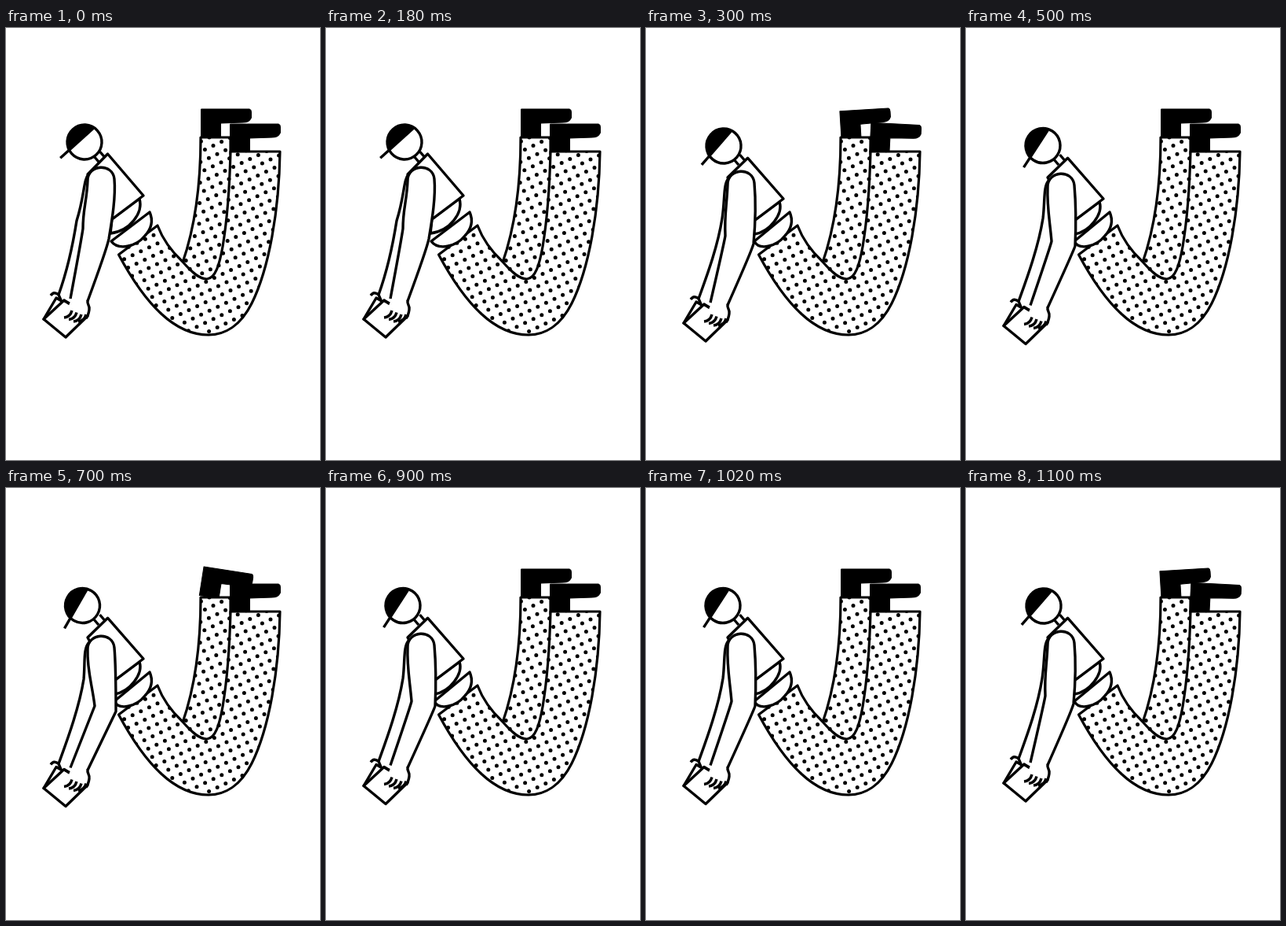
These frames come from a looping animation (400 px wide and 549 px high, 1300 ms). An HTML page with a canvas:

```html
<!DOCTYPE html>
<html lang="en">
<head>
<meta charset="utf-8">
<style>
html, body { margin: 0; width: 100%; height: 100%; overflow: hidden; background: #fff; }
canvas { display: block; width: 400px; height: 549px; }
</style>
</head>
<body>
<canvas id="stage"></canvas>
<script>
const W = 400, H = 549, LOOP = 1300;
const canvas = document.getElementById('stage');
const ctx = canvas.getContext('2d');
const dpr = window.devicePixelRatio || 1;
canvas.width = W * dpr;
canvas.height = H * dpr;

// Crouch poses, from stretched to fully bent
const POSES = [
  { head: [100, 145], cap: 42, chest: 0, arm: 0, hand: 0, inner: [98, 255], outer: [131, 268], back: [90, 245] },
  { head: [99, 150], cap: 49, chest: 4, arm: 5, hand: 5, inner: [101, 264], outer: [137, 274], back: [97, 242] },
  { head: [98, 149.5], cap: 57, chest: 4, arm: 8, hand: 8.5, inner: [109, 271], outer: [139, 277], back: [98, 242] },
  { head: [97.5, 149.5], cap: 60, chest: 4, arm: 11, hand: 11.5, inner: [113, 277], outer: [140, 284], back: [99, 243] }
];
const FLAT = [0, 0, 0];
// Foot tilt in degrees, then its shift
const STEPS = [
  { until: 300, pose: 0, far: FLAT, near: FLAT },
  { until: 500, pose: 1, far: [-3.5, 0.5, 2], near: [3, -0.5, -1] },
  { until: 700, pose: 2, far: FLAT, near: FLAT },
  { until: 900, pose: 3, far: [8.9, -2, -1.5], near: FLAT },
  { until: 1100, pose: 2, far: FLAT, near: FLAT },
  { until: 1300, pose: 1, far: [-3.5, 0.5, 2], near: [3, -0.5, -1] }
];

const FAR_LEG = new Path2D('M248 139 C248 205 240 255 225 298 L262 340 L300 300 V165 L286 160 V139 Z');
const NEAR_LEG = new Path2D('M143.5 288 L193 251 C201 272 212 285 225 297 C238 312 247 319 256 319 C267 318 272 300 276 278 C283 236 285 198 286 157 L349 157 C348 232 335 306 313 350 C299 378 279 390 258 390 C215 390 178 352 143.5 288 Z');
const SHOE = new Path2D('M0 0 H62 Q64 1 64 4 V11 Q62 17 54 17 L25 18 V37 H0 Z');

function ink(d, fill) {
  const p = new Path2D(d);
  if (fill) {
    ctx.fillStyle = fill;
    ctx.fill(p);
  }
  ctx.stroke(p);
}

function trousers(leg) {
  ctx.fillStyle = '#fff';
  ctx.fill(leg);
  ctx.save();
  ctx.clip(leg);
  ctx.fillStyle = '#000';
  ctx.beginPath();
  for (let i = -24; i <= 24; i++) {
    for (let j = -24; j <= 24; j++) {
      const x = 256 + 5 * i + 10.6 * j, y = 270 + 10.6 * i - 5 * j;
      if (x < 140 || x > 352 || y < 135 || y > 394) continue;
      ctx.moveTo(x + 2.5, y);
      ctx.arc(x, y, 2.5, 0, 7);
    }
  }
  ctx.fill();
  ctx.restore();
  ctx.stroke(leg);
}

function shoe(x, y, [deg, dx, dy]) {
  ctx.save();
  ctx.translate(x + 13 + dx, y + 35 + dy);
  ctx.rotate(deg * Math.PI / 180);
  ctx.translate(-13, -35);
  ctx.fillStyle = '#000';
  ctx.fill(SHOE);
  ctx.lineWidth = 1;
  ctx.stroke(SHOE);
  ctx.restore();
}

function legs(s) {
  ctx.lineWidth = 3.2;
  shoe(248.5, 103, s.far);
  trousers(FAR_LEG);
  shoe(285.5, 122, s.near);
  trousers(NEAR_LEG);
}

function head({ head: [x, y], cap, chest }) {
  const r = 22, off = 5.5, half = Math.acos(off / r);
  ink(`M112 ${163 + chest} l6 7 M119.5 ${157 + chest} l6 7`);
  ctx.save();
  ctx.translate(x, y);
  ctx.rotate(-cap * Math.PI / 180);
  ctx.beginPath();
  ctx.arc(0, 0, r, 0, 7);
  ctx.fillStyle = '#fff';
  ctx.fill();
  ctx.stroke();
  ctx.beginPath();
  ctx.arc(0, 0, r, -Math.PI / 2 - half, -Math.PI / 2 + half);
  ctx.fillStyle = '#000';
  ctx.fill();
  ink(`M-36.5 ${-off} H20`);
  ctx.restore();
}

function torso({ chest: c }) {
  const k = c / 4;
  ink(`M183 234 L${134 + 4 * k} 271 C${143 + k} 283 166 278 177 264 C187 253 187 243 183 234 Z`, '#fff');
  ink(`M170 ${217 + c} C175 ${235 + k} 158 ${258 + k} ${133 + 5 * k} ${261 + k} L135 ${243 + c} Z`, '#fff');
  ink(`M104 ${186 + c} L129.5 ${160 + 1.3 * c} L175 ${213 + c} L135 ${243 + c} Z`, '#fff');
}

function arms({ arm, hand: h, inner: [ix, iy], outer: [ox, oy], back: [bx, by] }) {
  const s = 190 + arm;
  ink(`M106 ${s - 5} C98 ${s + 3} 101 ${s + 20} ${bx} ${by} C${bx - 6} ${by + 38} 76 ${314 + h} 67 ${339 + h}`);
  // Booklet behind the hand
  ink(`M48 ${370 + h} L64 ${343 + h} L76 ${350 + h} Z`, '#fff');
  ink(`M57 ${340 + h} Q61 ${334 + h} 67 ${339 + h} L70 ${346 + h}`);
  ink(`M48 ${370 + h} L74 ${346 + h} L104 ${366 + h} L76 ${393 + h} Z`, '#fff');
  // Straight forearms, sharper elbows as the crouch deepens
  const bend = arm / 11;
  const joint = (x, y, dx) => `${x + dx * (1 - bend)} ${y + 14 * (1 - bend)}`;
  const side = `M82 ${344 + h} Q${joint(ix, iy, -2)} ${ix} ${iy}`
    + ` C${ix - 3 * bend} ${iy - 26} 103 ${s + 30} 104 ${s + 4}`
    + ` C104 ${s - 17} 136 ${s - 19} 138 ${s + 2}`
    + ` C140 ${s + 25} ${ox + 4 - 4 * bend} ${oy - 24} ${ox} ${oy}`
    + ` Q${joint(ox, oy, -3)} 104 ${347 + h}`;
  ctx.fillStyle = '#fff';
  ctx.fill(new Path2D(`${side} Q110 ${358 + h} 101 ${369 + h} L78 ${362 + h} Z`));
  ink(side);
  ink(`M104 ${346 + h} C103 ${352 + h} 107 ${352 + h} 106 ${358 + h} Q105 ${365 + h} 102 ${369 + h}`);
  ink(`M73 ${346 + h} L81 ${350 + h}`);
  for (let i = 0; i < 4; i++) {
    const x = 74 + 6 * i, y = 368 + h + Math.min(i, 2) * 2.5;
    ink(`M${x} ${y} Q${x + 8} ${y - 1} ${x + 10} ${y - 9}`);
  }
}

function draw(now) {
  const t = now % LOOP;
  const step = STEPS.find(s => t < s.until);
  const pose = POSES[step.pose];
  ctx.setTransform(dpr, 0, 0, dpr, 0, 0);
  ctx.fillStyle = '#fff';
  ctx.fillRect(0, 0, W, H);
  ctx.strokeStyle = '#000';
  ctx.lineJoin = 'round';
  legs(step);
  ctx.lineWidth = 3.4;
  torso(pose);
  head(pose);
  arms(pose);
}

const start = performance.now();
function tick() {
  draw(performance.now() - start);
  requestAnimationFrame(tick);
}
tick();
</script>
</body>
</html>
```
